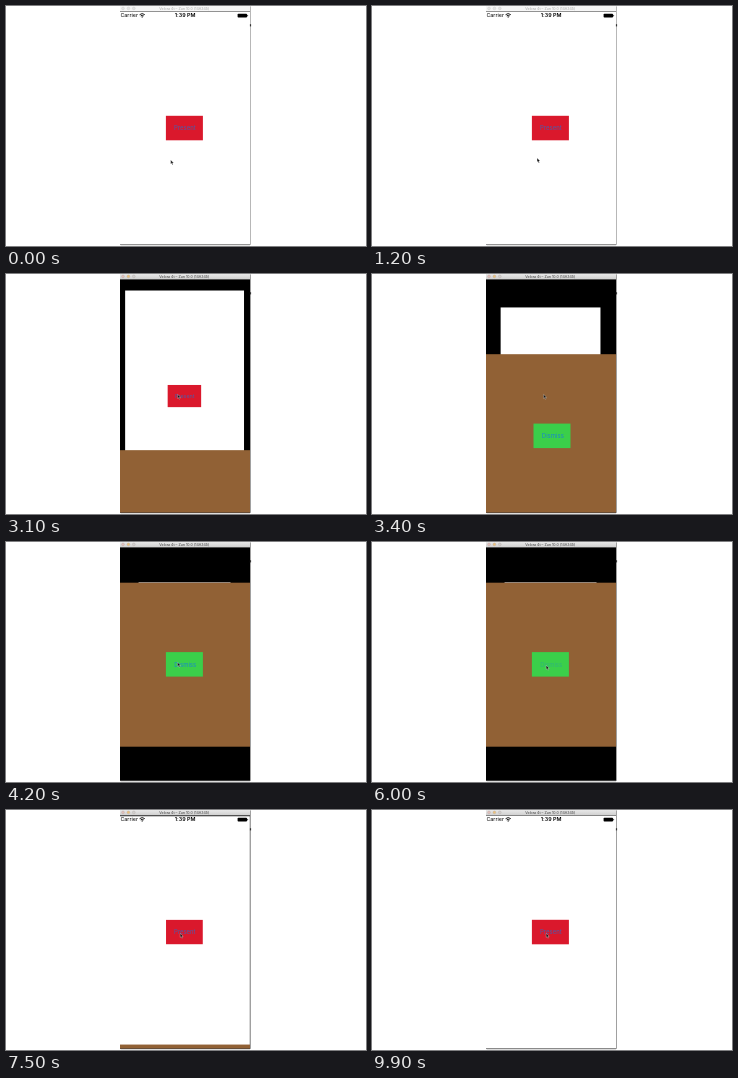
These frames come from a looping animation (360x240 px, 10000 ms). An HTML page:

```html
<!DOCTYPE html>
<html lang="en">
<head>
<meta charset="utf-8">
<style>
  html, body { margin: 0; width: 100%; height: 100%; overflow: hidden; background: #fff; }
  svg { display: block; width: 360px; height: 240px; }
  text { font-family: Inter, "Liberation Sans", sans-serif; text-anchor: middle; }
  .label { font-size: 6px; }
  #title { font-size: 3.6px; }
  .status { font-size: 5.4px; }
</style>
</head>
<body>
<svg viewBox="0 0 360 240">
  <defs>
    <clipPath id="screen"><rect x="114" y="5.5" width="130" height="233"/></clipPath>
    <linearGradient id="chrome" x2="0" y2="1">
      <stop stop-color="#e8e8e8"/><stop offset="1" stop-color="#cfcfcf"/>
    </linearGradient>
  </defs>

  <rect id="shadow" x="114" y="0" width="130.7" height="239.3" rx="1"/>
  <rect id="bar" x="114" y="0" width="130" height="5.5"/>
  <g id="lights" stroke-width=".4">
    <circle cx="117" cy="2.4" r="1.4"/>
    <circle cx="122.4" cy="2.4" r="1.4"/>
    <circle cx="127.8" cy="2.4" r="1.4"/>
  </g>
  <text id="title" x="178.3" y="3.8">Velora 4t – Zun 10.0 (14A345)</text>

  <g clip-path="url(#screen)">
    <rect x="114" y="5" width="131" height="234"/>
    <g id="home">
      <rect x="-65.5" y="-116.7" width="131.4" height="233.4" fill="#fff"/>
      <rect x="-18.5" y="-12.3" width="37" height="24.5" fill="#da182c"/>
      <text class="label" id="present" x=".4" y="2.2" fill="#2a6bc8" opacity=".8">Present</text>
    </g>
    <g id="modal">
      <rect x="-65" y="-81.7" width="131" height="164" fill="#916135"/>
      <g id="dismiss">
        <rect x="-18.5" y="-12.3" width="37" height="24.5" fill="#3bcf4a"/>
        <text class="label" id="dismissText" x=".8" y="2.2" fill="#1580d8">Dismiss</text>
      </g>
    </g>
    <text class="status" x="123.2" y="11.4">Carrier</text>
    <path d="M133.6 8.7q2.6-2.3 5.2 0M134.7 9.9q1.5-1.3 3 0" fill="none" stroke="#000" stroke-width=".9"/>
    <circle cx="136.2" cy="10.9" r=".7"/>
    <text class="status" x="179.2" y="11.4" font-weight="600">1:39 PM</text>
    <rect x="231.6" y="7.7" width="9.4" height="3.9" rx=".8"/>
    <rect x="241.3" y="8.8" width=".8" height="1.7" rx=".4"/>
  </g>
  <path d="M243.9 18.2h1.2v2.2h-1.2z" fill="#333"/>

  <path id="cursor" d="M0 0v4l.9-.8.7 1.6.8-.4-.7-1.5h1.3z" fill="#111" stroke="#fff" stroke-width=".3"/>
</svg>
<script>
  const LOOP = 10000, CLICK = 2700;
  const $ = id => document.getElementById(id);
  const set = (id, name, value) => $(id).setAttribute(name, value);
  const clamp = x => Math.min(1, Math.max(0, x));

  // cubic-bezier(.42, 0, .58, 1), solved by bisection
  function easeInOut(x) {
    x = clamp(x);
    if (x === 0 || x === 1) return x;
    let low = 0, high = 1, s;
    for (let i = 0; i < 20; i++) {
      s = (low + high) / 2;
      const bx = 1.26 * s * (1 - s) ** 2 + 1.74 * s * s * (1 - s) + s ** 3;
      if (bx < x) low = s; else high = s;
    }
    return s * s * (3 - 2 * s);
  }
  const phase = (t, start, length) => easeInOut((t - start) / length);

  function render(t) {
    const rise = phase(t, CLICK + 10, 1000);
    const shown = rise - phase(t, 6164, 1500);
    set('home', 'transform', `translate(178.4 122.1) scale(${1 - 0.3 * shown})`);
    set('modal', 'transform', `translate(178.4 ${122.4 + 198.5 * (1 - shown)})`);
    set('dismiss', 'transform', `translate(${8 * (1 - rise)} 0)`);
    set('dismissText', 'opacity', t > 6000 ? 0.35 : 0.9);

    const active = t >= CLICK;
    set('bar', 'fill', active ? 'url(#chrome)' : '#f6f6f6');
    set('title', 'fill', active ? '#3c3c3c' : '#a8a8a8');
    set('shadow', 'fill', active ? '#777' : '#999');
    const colors = active ? ['#e3c0bc', '#ecc27a', '#d0d0d0'] : Array(3).fill('#e4e4e4');
    [...$('lights').children].forEach((dot, i) => dot.setAttribute('fill', colors[i]));
    set('lights', 'stroke', active ? '#b5a9a5' : '#c8c8c8');

    const approach = phase(t, 1000, 1200), nudge = phase(t, 5500, 300);
    set('cursor', 'transform',
      `translate(${164.7 + 6.9 * approach + 2.6 * nudge} ${154 - 33.6 * approach + 3 * nudge})`);
  }

  const start = performance.now();
  (function tick() {
    render((performance.now() - start) % LOOP);
    requestAnimationFrame(tick);
  })();
</script>
</body>
</html>
```
